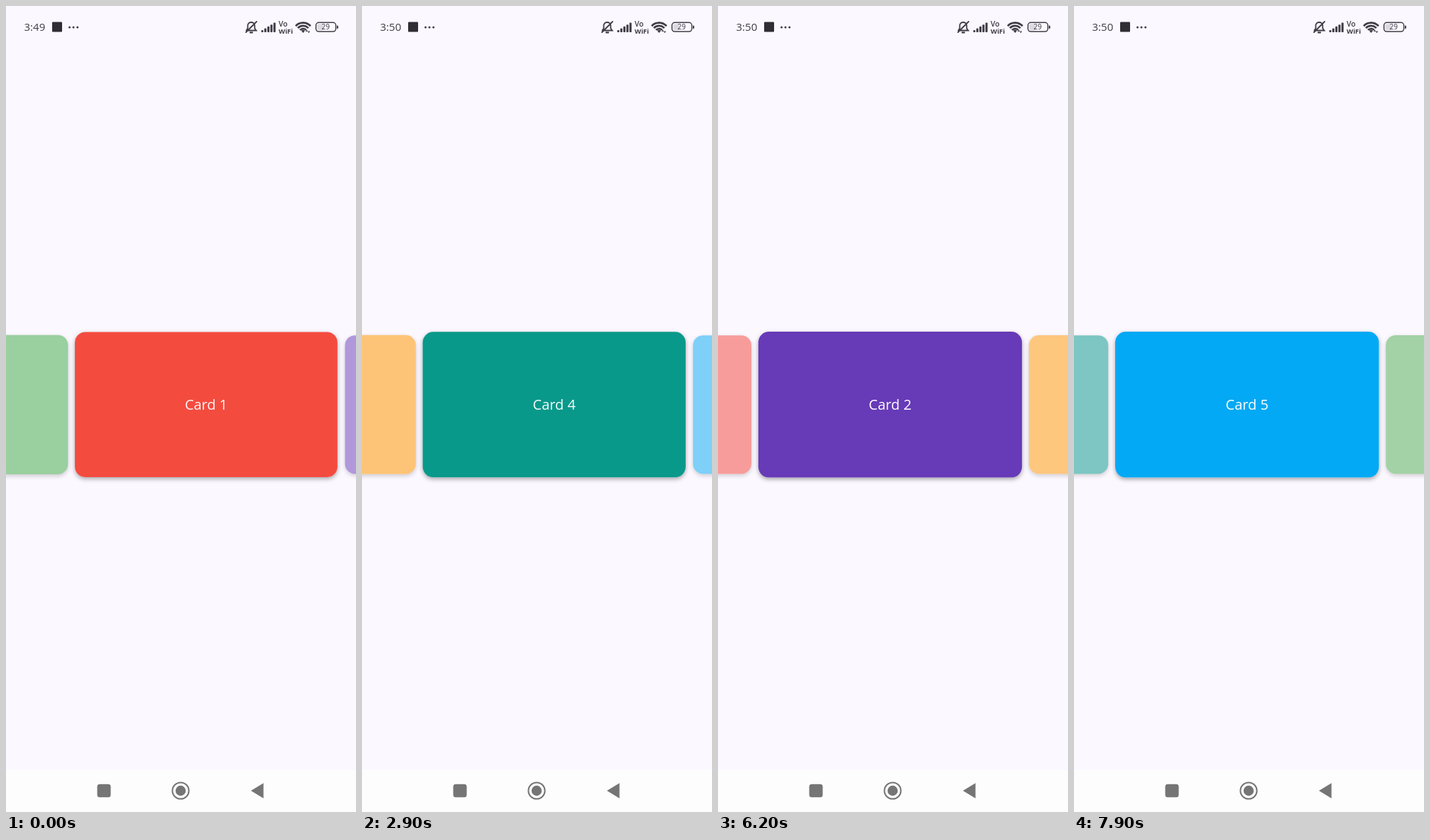
These frames come from a looping animation (493x1136 px, 8000 ms). An HTML page with a canvas:

```html
<!DOCTYPE html>
<html lang="en">
<head>
<meta charset="utf-8">
<title>Card carousel</title>
<style>
  html, body { margin: 0; width: 100%; height: 100%; overflow: hidden; background: #fcf8ff; }
  canvas { display: block; width: 493px; height: 1136px; }
</style>
</head>
<body>
<canvas id="stage" width="493" height="1136"></canvas>
<script>
const ctx = document.getElementById('stage').getContext('2d');
const W = 493, H = 1136, LOOP = 8000, STEP = 100;
const BG = '#fcf8ff', INK = '#403c44', NAV = '#757575';
const SANS = '"Open Sans", "Noto Sans", sans-serif';
const COLORS = ['#f44336', '#673ab7', '#ff9800', '#009688', '#03a9f4', '#4caf50'];
const CARD = { cx: 246.7, cy: 561.8, w: 371.6, h: 205.6, r: 15, pitch: 372 };

// Swipes: start in ms, direction, settling rate per second.
const FIRST_PAGE = -1;
const SWIPES = [
  [-216, 1, 25], [1200, 1, 25], [1990, 1, 25], [2690, 1, 28.3],
  [5260, -1, 22], [5870, -1, 25], [6475, -1, 25], [7020, -1, 25], [7552, -1, 25]
];

const clamp = v => Math.max(0, Math.min(1, v));
const ramp = (t, from, to) => clamp((t - from) / (to - from));

function settle(ms, rate) {
  if (ms <= 0) return 0;
  const s = rate * ms / 1000;
  return 1 - (1 + s + s * s / 2) * Math.exp(-s);
}

const pageAt = t =>
  SWIPES.reduce((page, [start, dir, rate]) => page + dir * settle(t - start, rate), FIRST_PAGE);

function box(x, y, w, h, r, fill) {
  ctx.beginPath();
  ctx.roundRect(x, y, w, h, r);
  ctx.fillStyle = fill;
  ctx.fill();
}

function disc(x, y, r, fill) {
  ctx.beginPath();
  ctx.arc(x, y, r, 0, 7);
  ctx.fillStyle = fill;
  ctx.fill();
}

function poly(points, fill) {
  ctx.beginPath();
  points.forEach(([x, y]) => ctx.lineTo(x, y));
  ctx.closePath();
  ctx.fillStyle = fill;
  ctx.fill();
}

function label(text, x, y, size, fill, align = 'left', weight = 400) {
  ctx.font = `${weight} ${size}px ${SANS}`;
  ctx.textAlign = align;
  ctx.fillStyle = fill;
  ctx.fillText(text, x, y);
}

function shadow(alpha, blur, dy) {
  ctx.shadowColor = `rgba(0,0,0,${alpha})`;
  ctx.shadowBlur = blur;
  ctx.shadowOffsetY = dy;
}

const noShadow = () => shadow(0, 0, 0);

function drawRipple(t) {
  const grow = ramp(t, 3500, 3800), alpha = 0.1 * (1 - ramp(t, 3750, 4100));
  if (!grow || !alpha) return;
  ctx.save();
  ctx.clip();
  disc(0, 0, 40 + 180 * grow, `rgba(0,0,0,${alpha})`);
  ctx.restore();
}

function drawCard(index, page, t) {
  const offset = index - page;
  const far = Math.min(1, Math.abs(offset));
  const number = ((index % 6) + 6) % 6;
  const { w, h, r } = CARD;
  ctx.save();
  ctx.translate(CARD.cx + offset * CARD.pitch, CARD.cy);
  ctx.scale(1 - 0.05 * far, 1 - 0.05 * far);
  shadow(0.36 * (1 - 0.5 * far), 6, 2.5);
  box(-w / 2, -h / 2, w, h, r, BG);
  noShadow();
  ctx.globalAlpha = 1 - 0.5 * far;
  box(-w / 2, -h / 2, w, h, r, COLORS[number]);
  if (far < 0.01) drawRipple(t);
  label(`Card ${number + 1}`, 0, 7, 20, '#fff', 'center');
  ctx.restore();
}

function drawToast(t) {
  const alpha = ramp(t, 3600, 3900) * (1 - ramp(t, 5750, 6000));
  if (!alpha) return;
  ctx.save();
  ctx.globalAlpha = alpha;
  shadow(0.13, 30, 15);
  box(123, 919.5, 247, 69, 17, '#fafafa');
  shadow(0.1, 2, 0.5);
  box(123, 919.5, 247, 69, 17, '#fafafa');
  noShadow();
  box(148, 937.5, 31, 32, 6.5, '#b9c4bd');
  box(149.3, 938.8, 28.4, 29.2, 5.5, '#41d987');
  label('You clicked on card 4', 191.5, 959, 15.5, '#222');
  ctx.restore();
}

function drawBell() {
  ctx.strokeStyle = INK;
  ctx.lineWidth = 1.8;
  ctx.lineCap = 'round';
  ctx.stroke(new Path2D(
    'M338.5 34.5H352.5L350.3 31.5V27.5C350.3 21.5 340.5 21.5 340.5 27.5V31.5L338.5 34.5M338 37L353 22'));
  box(343, 36.2, 5, 2.2, 1, INK);
}

function drawWifi() {
  const x = 418.5, y = 38;
  ctx.lineCap = 'butt';
  ctx.lineWidth = 2.7;
  ctx.strokeStyle = INK;
  for (const r of [14.3, 10.1, 6]) {
    ctx.beginPath();
    ctx.arc(x, y, r, -Math.PI * 0.76, -Math.PI * 0.24);
    ctx.stroke();
  }
  poly([[x - 2.6, 34.8], [x, 33.2], [x + 2.6, 34.8], [x, 38]], INK);
  poly([[422, 36], [423.6, 33.5], [425.2, 36]], INK);
  poly([[425, 35.5], [426.6, 38.3], [428.2, 35.5]], INK);
}

function drawStatus(t) {
  label(t < 2400 ? '3:49' : '3:50', 25.5, 34.5, 15, INK);
  box(65, 22.5, 14, 14, 1, '#302d33');
  for (const x of [89.5, 95, 100.7]) disc(x, 30, 1.5, INK);
  drawBell();
  for (let i = 0; i < 5; i++) {
    const h = 3 + i * 2.6;
    box(359.5 + i * 4.3, 37 - h, 3, h, 1, INK);
  }
  label('Vo', 384, 29, 10.5, INK, 'left', 600);
  label('WiFi', 384, 38.5, 9.5, INK, 'left', 700);
  drawWifi();
  box(438.5, 25.3, 9, 9, 2, '#dcd9df');
  ctx.beginPath();
  ctx.roundRect(436.6, 23.3, 28, 12.8, 4);
  ctx.lineWidth = 1.5;
  ctx.strokeStyle = INK;
  ctx.stroke();
  box(466, 27.5, 2, 4.5, 1, INK);
  label('29', 450.3, 33.2, 10, INK, 'center');
}

function drawNav() {
  ctx.fillStyle = '#fdfdfd';
  ctx.fillRect(0, 1076.5, W, 60);
  box(128.5, 1096.8, 19, 18.5, 3.5, NAV);
  disc(246, 1106, 7.2, NAV);
  ctx.beginPath();
  ctx.arc(246, 1106, 11.6, 0, 7);
  ctx.lineWidth = 2;
  ctx.strokeStyle = NAV;
  ctx.stroke();
  poly([[345, 1106], [362.7, 1095.3], [362.7, 1116.7]], NAV);
}

function draw(t) {
  ctx.fillStyle = BG;
  ctx.fillRect(0, 0, W, H);
  const page = pageAt(t);
  const middle = Math.round(page);
  for (const side of [-1, 1, 0]) drawCard(middle + side, page, t);
  drawToast(t);
  drawStatus(t);
  drawNav();
}

const begin = performance.now();
function tick() {
  const t = (performance.now() - begin) % LOOP;
  draw(Math.floor(t / STEP) * STEP);
  requestAnimationFrame(tick);
}
tick();
</script>
</body>
</html>
```
